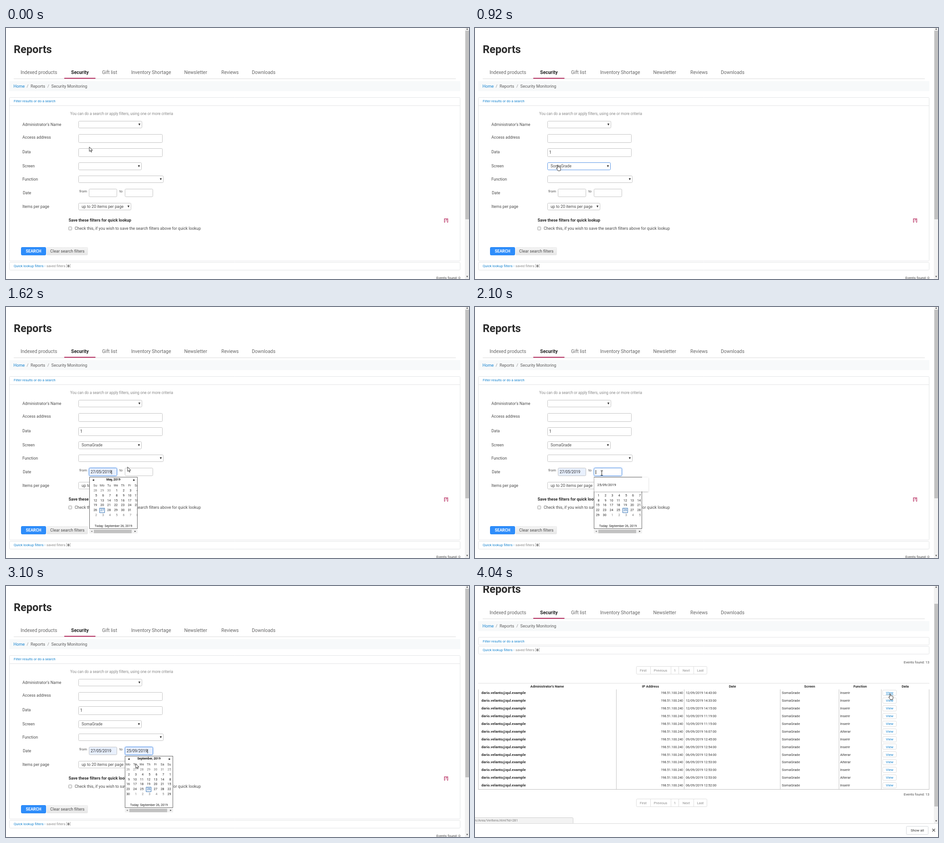
Animation of 1017 by 551 pixels, one loop 4.27 s. Source, as an HTML page with a canvas:

```html
<!DOCTYPE html>
<html lang="en">
<head>
<meta charset="utf-8">
<title>Reports</title>
<style>
html, body { margin: 0; width: 100%; height: 100%; overflow: hidden; background: #fff; }
canvas { display: block; width: 1017px; height: 551px; }
</style>
</head>
<body>
<canvas id="stage" width="1017" height="551"></canvas>
<script>
const W = 1017, H = 551, LOOP = 4270;
const ctx = document.getElementById('stage').getContext('2d');
const INK = '#4c4c4c', DARK = '#2b2b2b', MUTED = '#8a8a8a', LINK = '#1583cf', WINE = '#b01850';
const LINE = '#e3e4e6', FIELD = '#c4c4c4', FOCUS = '#5a96e6', AUTOFILL = '#e8f0fe';
const SCREEN = 'SomaGrade';

// [start, x, y, kind]: the pointer holds each pose until the next one
const POINTER = [
  [0, 183, 261, 'arrow'], [80, 183, 269, 'beam'], [540, 183, 275, 'beam'], [610, 178, 300, 'hand'],
  [1150, 204, 346, 'arrow'], [1230, 206, 362, 'beam'], [1380, 206, 384, 'arrow'], [1460, 208, 390, 'arrow'],
  [1540, 232, 372, 'arrow'], [1620, 267, 351, 'arrow'], [1720, 274, 361, 'beam'], [1790, 280, 362, 'beam'],
  [1950, 278, 364, 'beam'], [2110, 274, 368, 'beam'], [2250, 270, 376, 'arrow'], [2490, 269, 387, 'arrow'],
  [2560, 270, 394, 'arrow'], [2640, 271, 393, 'arrow'], [2950, 276, 391, 'arrow'], [3030, 280, 391, 'arrow'],
  [3100, 285, 390, 'arrow'], [3210, 130, 523, 'arrow'], [3270, 57, 486, 'hand'],
  [3490, 912, 236, 'arrow'], [3630, 908, 236, 'hand']
];

function text(s, x, y, size = 8.87, color = INK, align = 'left', weight = 400) {
  ctx.font = `${weight} ${size}px Roboto, sans-serif`;
  ctx.fillStyle = color;
  ctx.textAlign = align;
  ctx.fillText(s, x, y);
}
const bold = (s, x, y, size, color = DARK, align = 'left') => text(s, x, y, size, color, align, 700);

function fill(x, y, w, h, color) {
  ctx.fillStyle = color;
  ctx.fillRect(x, y, w, h);
}

function box(x, y, r, b, { border = FIELD, bg = '#fff', radius = 2, glow = false } = {}) {
  ctx.save();
  ctx.beginPath();
  ctx.roundRect(x + .5, y + .5, r - x - 1, b - y - 1, radius);
  if (glow) { ctx.shadowColor = 'rgba(70,140,235,.6)'; ctx.shadowBlur = 4; }
  ctx.fillStyle = bg;
  ctx.fill();
  ctx.restore();
  ctx.strokeStyle = border;
  ctx.lineWidth = 1;
  ctx.stroke();
}

function poly(points, color) {
  ctx.beginPath();
  points.forEach(([x, y]) => ctx.lineTo(x, y));
  ctx.closePath();
  ctx.fillStyle = color;
  ctx.fill();
}

// Small triangle; dx and dy give the way it points
function triangle(x, y, dx, dy, r = 2.5, color = '#333') {
  poly([[x + dx * r, y + dy * r], [x - dx * r + dy * r, y - dy * r + dx * r],
        [x - dx * r - dy * r, y - dy * r - dx * r]], color);
}

function select(x, y, r, b, value = '', focused = false) {
  box(x, y, r, b, { border: focused ? FOCUS : FIELD });
  text(value, x + 7, y + 11.3, 8.8);
  triangle(r - 6, (y + b) / 2, 0, 1, 2.2);
}

function input(x, y, r, b, { value = '', size = 8.5, focused = false, filled = false, caret = -1 } = {}) {
  box(x, y, r, b, { border: focused ? FOCUS : FIELD, bg: filled ? AUTOFILL : '#fff', glow: focused });
  text(value, x + 4, y + 12.4, size, DARK);
  if (caret >= 0) fill(x + 4 + caret, y + 5, 1, 9, '#111');
}

function header(dy) {
  ctx.save();
  ctx.translate(0, dy);
  bold('Reports', 17, 54.8, 23.6);
  fill(17, 111, 971, 1, '#dcdcdc');
  fill(128, 109.5, 68.5, 1.8, WINE);
  const tabs = { 'Indexed products': 32, 'Gift list': 211, 'Inventory Shortage': 275,
    Newsletter: 391.5, Reviews: 473, Downloads: 540 };
  for (const name in tabs) text(name, tabs[name], 101.2, 10.45, '#666');
  bold('Security', 143, 101.2, 10.45, '#222');
  fill(7, 116.5, 991, 22, '#f7f9fa');
  text('Home', 16.5, 130.5, 9.2, LINK);
  text('/', 45.5, 130.5, 9.2, MUTED);
  text('Reports', 54, 130.5, 9.2, '#5c5c5c');
  text('/', 91, 130.5, 9.2, MUTED);
  text('Security Monitoring', 99.5, 130.5, 9.15, '#5c5c5c');
  ctx.restore();
}

function filterTitle(y) { text('Filter results or do a search', 17, y, 7.6, LINK); }

function quickLookup(y) {
  box(7, y, 998, y + 18, { border: LINE });
  text('Quick lookup filters -', 17, y + 11.2, 7.7, LINK);
  text('saved filters [', 89, y + 11.2, 7.7, MUTED);
  bold('0', 135, y + 11.2, 7.7);
  text(']', 140, y + 11.2, 7.7, MUTED);
}

function scrollbar(from, to, bottom) {
  fill(1008, 0, 9, bottom, '#f1f1f1');
  fill(1009, from, 8, to - from, '#c1c1c1');
  triangle(1013, 2, 0, -1, 1.8, '#505050');
  triangle(1013, bottom - 5, 0, 1, 1.8, '#505050');
}

function calendar(left, month, offset, selected, rotate = 0) {
  const title = ['May', 'September'][month === 4 ? 0 : 1];
  fill(left, 373, 106, 124, '#fff');
  ctx.save();
  ctx.beginPath();
  ctx.rect(left, 373, 106, 114);
  ctx.clip();
  triangle(left + 8.5, 380, -1, 0, 2, '#111');
  triangle(left + 98.5, 380, 1, 0, 2, '#111');
  bold(`${title}, 2019`, left + 53, 381.3, 6.7, '#111', 'center');
  const days = ['Su', 'Mo', 'Tu', 'We', 'Th', 'Fr', 'Sa'];
  const lead = new Date(2019, month, 1).getDay() || 7;
  for (let col = 0; col < 7; col++) {
    const day = (col + rotate) % 7, x = left + offset + col * 15.1;
    text(days[day], x - 4, 394.3, 7, '#444', 'center');
    for (let row = 0; row < 6; row++) {
      const date = new Date(2019, month, 1 - lead + row * 7 + day), y = 405.3 + row * 10.7;
      const inside = date.getMonth() === month, chosen = inside && date.getDate() === selected;
      if (chosen) box(x - 10, y - 7, x + 2, y + 4, { border: '#3a76b5', bg: '#eef5fc', radius: 0 });
      text(date.getDate(), x, y, 7, chosen ? '#2a66a8' : inside ? '#222' : '#777', 'right');
    }
  }
  text('Today: September 26, 2019', left + 53, 482.8, 6.83, '#222', 'center');
  ctx.restore();
  ctx.strokeStyle = '#666';
  ctx.lineWidth = 1;
  ctx.strokeRect(left + .5, 373.5, 105, 113);
  fill(left, 488, 106, 9, '#f1f1f1');
  fill(left + 10, 489, 83, 7.5, '#c1c1c1');
  triangle(left + 5, 492.5, -1, 0, 1.6, '#777');
  triangle(left + 101, 492.5, 1, 0, 1.6, '#333');
}

function suggestion(left, value, hovered) {
  ctx.save();
  ctx.shadowColor = 'rgba(0,0,0,.3)';
  ctx.shadowBlur = 3;
  ctx.shadowOffsetY = 1;
  fill(left + .5, 374, 119.5, 31, '#fff');
  ctx.restore();
  if (hovered) fill(left + .5, 378.5, 119.5, 22.5, '#e6e9ec');
  text(value, left + 7.5, 393, 7.8, '#222');
}

function screenList() {
  const names = ['', 'AvisoGrade', 'BlocoGrade', 'CaixaGrade', SCREEN, 'FaixaGrade',
    'GrupoGrade', 'ListaGrade', 'NotaGrade', 'PastaGrade', 'TextoGrade'];
  box(160, 312, 298, 414, { border: '#999', radius: 0 });
  names.forEach((name, i) => {
    const y = 313 + i * 9.1;
    if (name === SCREEN) fill(161, y, 136, 9.1, '#1e90ff');
    text(name, 167, y + 7.3, 8.3, name === SCREEN ? '#fff' : INK);
  });
}

function formPage(t) {
  header(0);
  box(7, 152, 998, 512, { border: LINE });
  fill(7, 170, 991, 1, LINE);
  filterTitle(163.2);
  text('You can do a search or apply filters, using one or more criteria', 141, 191, 8.28, MUTED);
  [["Administrator's Name", 214.5], ['Access address', 243.2], ['Data', 274.5], ['Screen', 306],
   ['Function', 334.8], ['Date', 364.8], ['Items per page', 395]]
    .forEach(([name, y]) => text(name, name === 'Date' ? 37 : 36, y));

  const typed = t >= 540, dataFocus = t >= 160 && t < 610, picked = t >= 610;
  select(159, 204, 299, 220);
  input(159, 233, 344, 252);
  input(159, 264, 344, 283, { value: typed ? '1' : '', focused: dataFocus, caret: dataFocus && t >= 240 ? (typed ? 5 : 0) : -1 });
  select(159, 295, 298, 312, picked ? SCREEN : '', picked && t < 1150);
  select(159, 324, 346, 340);
  select(159, 384, 275, 400, 'up to 20 items per page');

  bold('Save these filters for quick lookup', 137.5, 425.2, 8.97);
  bold('[?]', 962, 425.2, 8.9, WINE);
  box(137, 436, 145, 444, { border: '#a5a5a5', bg: '#f0f0f0', radius: 1 });
  text('Check this, if you wish to save the search filters above for quick lookup', 151, 443);

  const pressed = t >= 3330;
  box(33, 481, 88, 499, { border: pressed ? '#1767c9' : '#2787f5', bg: pressed ? '#1b72dc' : '#2e8dfb' });
  bold('SEARCH', 60.5, 493.2, 8.85, '#fff', 'center');
  const shade = ctx.createLinearGradient(0, 481, 0, 499);
  shade.addColorStop(0, '#f4f4f4');
  shade.addColorStop(1, '#e6e6e6');
  box(89, 481, 180, 499, { border: '#ececec', bg: shade });
  text('Clear search filters', 97, 493.2, 9.1);
  quickLookup(514);
  text('Events found: 0', 998, 551, 7.73, INK, 'right');
  scrollbar(6, 420, H);

  text('from', 161, 361, 8);
  text('to', 249, 361, 8);
  const fromFocus = t >= 1230 && t < 1950, toFocus = t >= 1950 && t < 3210;
  const fromSet = t >= 1460, toSet = t >= 2950, toHover = t >= 2490;
  input(182, 353, 244, 371, {
    value: t >= 1380 ? '27/05/2019' : '', size: fromSet ? 8.5 : 8.1, focused: fromFocus,
    filled: t >= 1380, caret: fromFocus ? (fromSet ? 45.5 : 0) : -1
  });
  input(261, 353, 323, 371, {
    value: toHover ? '25/09/2019' : '', size: toSet ? 8.5 : 8.1, focused: toFocus,
    filled: toHover, caret: toFocus ? (toSet ? 45.5 : 0) : -1
  });
  if (fromFocus) {
    if (t < 1540) calendar(183, 8, 12, 26);
    else calendar(183, 4, 17, 27);
    if (!fromSet) suggestion(183, '27/05/2019', t >= 1380);
  }
  if (toFocus) {
    if (t < 3030) calendar(261, 8, 12.5, 26);
    else calendar(261, 8, 11, 26, 1);
    if (!toSet) suggestion(261, '25/09/2019', toHover);
  }
  if (t >= 610 && t < 920) screenList();
}

function pagination(y) {
  box(354, y, 510, y + 18, { border: '#dedede' });
  [385, 430, 447, 480].forEach(x => fill(x, y, 1, 18, '#dedede'));
  [['First', 369.5], ['Previous', 407.5], ['1', 439], ['Next', 464], ['Last', 495]]
    .forEach(([s, x]) => text(s, x, y + 11.7, 7.65, MUTED, 'center'));
}

function table() {
  fill(7, 213, 991, 1, '#e0e0e0');
  [["Administrator's Name", 158.5], ['IP Address', 385.5], ['Date', 565.5], ['Screen', 735],
   ['Function', 846], ['Data', 945]].forEach(([s, x]) => bold(s, x, 222.8, 7.6, DARK, 'center'));
  [7, 310, 459, 670, 799, 892, 997].forEach(x => fill(x, 227, 1, 220, '#c6c6c6'));
  fill(7, 446, 991, 1, '#c0c0c0');
  const stamps = ['12 14:43', '12 14:33', '12 14:15', '10 11:19', '10 11:15', '09 16:07', '09 12:45',
    '06 12:54', '06 12:54', '06 12:53', '06 12:53', '06 12:53', '06 12:52'];
  const changed = [5, 8, 9, 11];
  stamps.forEach((stamp, i) => {
    const mid = 234.5 + i * 16.92, y = mid + 2.7, [day, time] = stamp.split(' ');
    bold('dario.velanto@qul.example', 14, y, 7.95);
    text('198.51.100.240', 457, y, 7, '#333', 'right');
    text(`${day}/09/2019 ${time}:00`, 463, y, 7.15, '#333');
    text(SCREEN, 674, y, 7.6, '#333');
    text(changed.includes(i) ? 'Alterar' : 'Inserir', 802, y, 7.8, '#333');
    box(895, Math.round(mid - 6.5), 926, Math.round(mid + 6.5), { border: '#dedede' });
    text('View', 910.7, y, 7.65, LINK, 'center');
    if (!i) fill(902.5, y + 1, 16.5, .8, LINK);
  });
}

function resultPage(t) {
  const bottom = t < 3870 ? H : t < 3955 ? 541 : t < 4040 ? 531 : 521;
  const shelf = bottom < H;
  header(-39.5);
  box(7, 112, 998, 130, { border: LINE });
  filterTitle(123.8);
  quickLookup(132);
  text('Events found: 13', 998, 169.6, 7.6, INK, 'right');
  pagination(176);
  table();
  text('Events found: 13', 998, 460, 7.6, INK, 'right');
  pagination(467);
  text('QULM Copyright © 2006 - 2019', 1008, 544.2, 7.3, '#333', 'right');
  scrollbar(shelf ? 39 : 41, shelf ? bottom - 37 : 541, bottom);

  const right = shelf ? 216 : 103, top = bottom - (shelf ? 13.5 : 11.5);
  box(-3, Math.round(top), right, bottom + 2, { border: '#d0d0d0', bg: '#f3f3f3' });
  text('n/Area/VerItens.html?Id=281', 0, top + 9, 7.3, '#777');
  if (shelf) {
    fill(0, bottom, W, 30, '#fff');
    fill(0, bottom, W, 1, '#dadada');
    box(947, bottom + 6, 996, bottom + 25, { border: '#d5d8dc' });
    text('Show all', 971.5, bottom + 18, 7.75, '#333', 'center');
    ctx.strokeStyle = '#555';
    ctx.lineWidth = 1.2;
    ctx.beginPath();
    for (const s of [-1, 1]) {
      ctx.moveTo(1004.5, bottom + 15 - 3 * s);
      ctx.lineTo(1010.5, bottom + 15 + 3 * s);
    }
    ctx.stroke();
  }
}

const SHAPES = {
  arrow: 'M0 0V10L2.3 8L4 11.6L5.5 10.9L3.9 7.4H7Z',
  hand: 'M3 1.2Q3.9 -.2 4.9 1.2V5L6.3 4.7L7.6 5.4L8.9 5.4L10.2 6.6V10.2L9.2 13.5H4.2L2.8 10.8L.6 8Q.8 6.4 3 8Z'
};
for (const kind in SHAPES) SHAPES[kind] = new Path2D(SHAPES[kind]);

function pointer(t) {
  const [, x, y, kind] = POINTER.findLast(pose => pose[0] <= t);
  if (kind === 'beam') {
    fill(x, y - 5, 1, 11, '#222');
    fill(x - 2, y - 5, 5, 1, '#222');
    fill(x - 2, y + 5, 5, 1, '#222');
    return;
  }
  ctx.save();
  ctx.translate(x, y);
  ctx.fillStyle = '#fff';
  ctx.fill(SHAPES[kind]);
  ctx.strokeStyle = '#222';
  ctx.lineWidth = .9;
  ctx.stroke(SHAPES[kind]);
  ctx.restore();
}

const start = performance.now();
function draw() {
  const t = (performance.now() - start) % LOOP;
  fill(0, 0, W, H, '#fff');
  if (t < 3490) formPage(t);
  else resultPage(t);
  pointer(t);
  requestAnimationFrame(draw);
}
draw();
</script>
</body>
</html>
```
